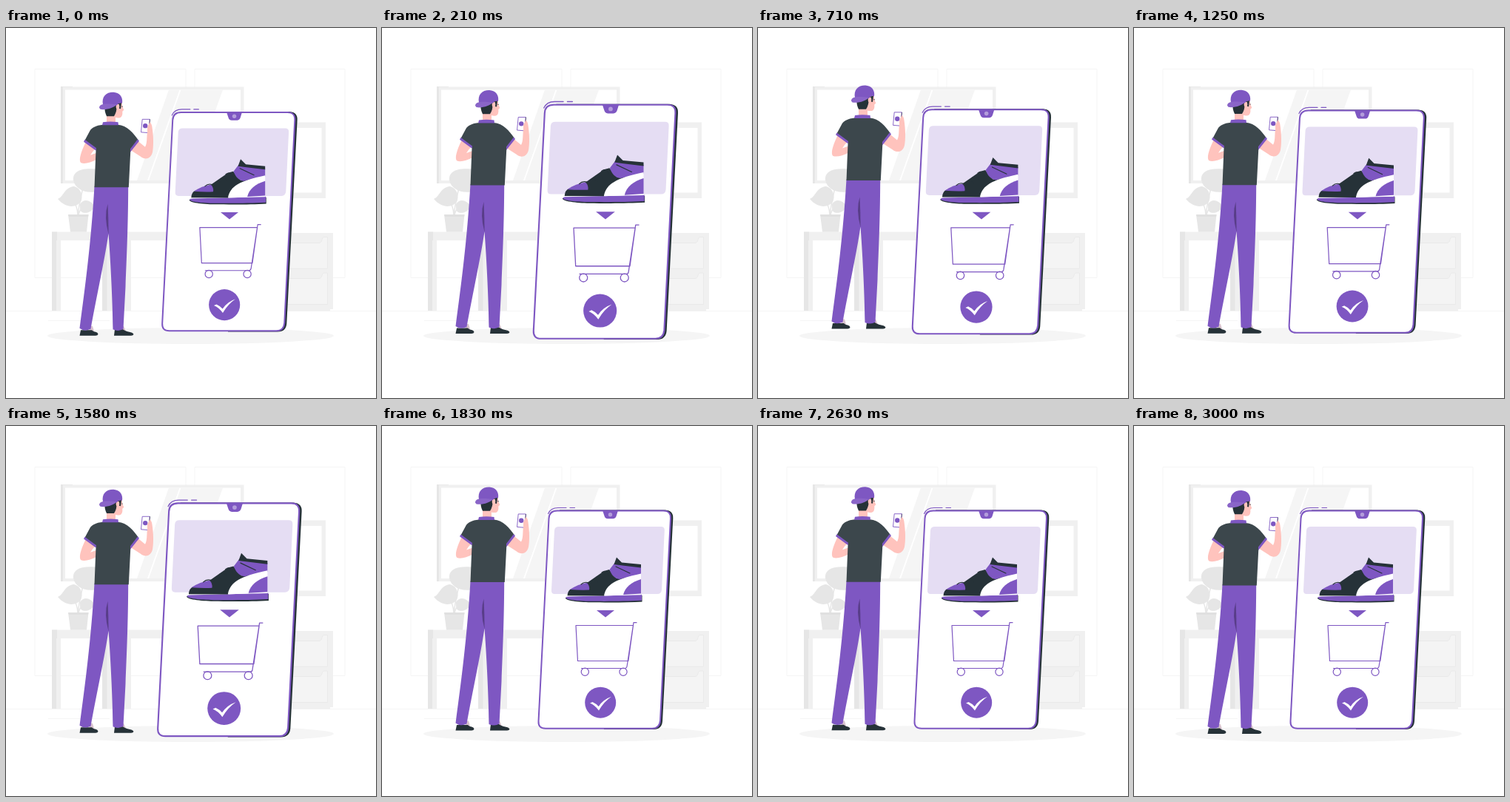
Write an HTML page that moves like this. It is 500 px wide and 500 px high and loops after 3040 ms.

```html
<!DOCTYPE html>
<html lang="en">
<head>
<meta charset="utf-8">
<title>Mobile shopping</title>
<style>
html, body { margin: 0; height: 100%; overflow: hidden; background: #fff; }
svg { display: block; width: 100vw; height: 100vh; }
.p { fill: #7e57c2; }
.d { fill: #263238; }
.s { fill: #ffc3bd; }
.w { fill: #fff; }
.g1 { fill: #f5f5f5; }
.g2 { fill: #f0f0f0; }
.g3 { fill: #e6e6e6; }
.line { fill: none; stroke: #7e57c2; stroke-width: 1.2; stroke-linecap: round; stroke-linejoin: round; }
.thin { fill: none; stroke: #f3f3f3; stroke-width: .8; }
.lace { fill: none; stroke: #263238; stroke-width: 1.1; stroke-linecap: round; }
</style>
</head>
<body>
<svg viewBox="0 0 500 500">
  <!-- room -->
  <path class="thin" d="M0 382.5H500M57 395.5H140M39 55.5H243V337.5H39ZM255 55.5H458V337.5H255Z"/>
  <path class="g3" d="M74 79H90V210H74Z"/>
  <path class="g2" d="M77 79.5H321.5V210H77Z"/>
  <path class="w" d="M80 83.5H317V206H80Z"/>
  <path class="g1" d="M220 83.5H234.5L191 206H177ZM236.5 83.5H293L249 206H193Z"/>
  <path class="g2" d="M340 127.5H432V230H340Z"/>
  <path class="w" d="M346 135H426.5V222.5H346Z"/>
  <path class="g2" d="M330 277H442V380H330Z"/>
  <path class="g2" d="M334 380H438V382.5H334Z"/>
  <path d="M340 290.500H423C428 290.500 426 282.500 430 282.500H434.500V325H340M340 338.500H423C428 338.500 426 331 430 331H434.500V373.500H340" fill="#f4f4f4" stroke="#e8e8e8" stroke-width=".8"/>
  <path class="g2" d="M62 275.500H300V287H74V382H62ZM130 287H169V382H130Z"/>
  <path class="g3" d="M62 275.500H69V287H68V382H62ZM130 287H136.500V382H130Z"/>
  <!-- plant -->
  <path d="M97 253C99 237 104 215 108 200M87 230Q97 239 97 253M108 240Q99 244 98 253" fill="none" stroke="#e6e6e6" stroke-width="1.5"/>
  <path class="g3" d="M91 206C90 194 100 188 126 191V220C110 225 94 219 91 206ZM70 231C78 228 79 215 92 214C101 216 105 227 101 235C94 244 80 243 70 231ZM100 238C105 230 114 232 120 241C116 250 104 253 100 246Z"/>
  <path class="g3" d="M84 252H111.500L109 275.500H87Z"/>
  <path d="M84 252H111.500L111 255H85Z" fill="#e0e0e0"/>
  <ellipse class="g1" cx="249.500" cy="416" rx="193.500" ry="11"/>

  <g id="device">
    <path class="d" d="M240 113.600H383Q394 114.500 393.300 125L379 399Q378 410 367 410H300Z"/>
    <path d="M237 114.500H380Q390.500 114.500 390 125L376 398Q375 408.800 365 408.800H221Q211 408.800 211.500 399L225.500 125Q226 114.500 237 114.500Z" fill="#fff" stroke="#7e57c2" stroke-width="2"/>
    <path class="line" d="M224.500 118.500Q228 110.500 238 110.500H249M254 110.500H260.500"/>
    <path class="p" d="M298 114L300.500 121.500Q301.500 125.300 305 125.300H312Q315.500 125.300 316.700 121.500L319 114Z"/>
    <circle cx="308.500" cy="119.800" r="2.700" fill="#b39ddb"/>
    <path d="M239 136H377Q382 136 381.800 141L378 221Q377.500 227 372 227H233.500Q228.500 227 229 221.500L233 141Q233.500 136 239 136Z" fill="#e5ddf3"/>
    <!-- sneaker -->
    <path class="d" d="M248 232L351.500 229V237.500C330 238.800 300 238.500 282 238.300C265 238 247 236 248 232Z"/>
    <path class="p" d="M248.500 231.500Q250 230 253 230L351 227.800V235.800C330 237 300 237 282 236.800C265 236.500 248 235 248.500 231.500Z"/>
    <path class="w" d="M250 228.500L350 226V228.300L250 230.500Z"/>
    <path class="d" d="M250.500 229.300Q251 222 256 220L277 212L300 196L307 194L317 206L331 204L306 217L301 229.500Z"/>
    <path class="p" d="M254 221C261 216 269 213 277 212Q281 216 280 221.500Q268 222 254 221Z"/>
    <path class="p" d="M307.500 194L314 185.500L350 190V201C340 202 330 205 321 207C314 206 310 201 307.500 194Z"/>
    <path class="w" d="M300 229.500C303 214 315 207 350 199.500V207.500C337 211 328 218 326 228.500Z"/>
    <path class="p" d="M326 228C328.500 218 337 211 350 207V226.500Z"/>
    <path class="d" d="M313.500 187L317 177.500L324 184.500L350 187V191.500L325 188.500Z"/>
    <path class="lace" d="M316 190L335 199M269 214Q274 209 282 213M282 210Q288 205 292 211M290 204Q296 200 299 207M297 198Q303 193 306 202"/>
    <!-- cart -->
    <path class="p" d="M290 249H314L302 258.500Z"/>
    <path class="line" d="M339.500 269.500H262L264.500 317.500H332.800M344 265.700H340L331 325Q330.500 327.500 328 327.500H269.500M339.500 269.500L332.800 317.500"/>
    <circle class="line" cx="274.300" cy="332.200" r="5.100"/>
    <circle class="line" cx="326" cy="332.200" r="5.100"/>
    <circle class="p" cx="295.200" cy="373.700" r="21"/>
    <path class="w" d="M281 374.500L284.500 373Q290 375.500 292.700 379Q299 369.500 310 365.800Q300 372.500 293 384.500Q287.500 377 281 374.500Z"/>
  </g>

  <g id="man">
    <!-- shoes and trousers -->
    <path d="M113 403H117L119 410H113ZM156 403H159L162 410H156Z" fill="#d9c4cf"/>
    <path class="d" d="M101 408.500H116C119 411.500 124 410.500 124.500 414Q124 416 121 416H99.500ZM147 407.500H158C163 411.500 171 410.500 172.500 414Q172 416 169 416H146Z"/>
    <path class="p" d="M119.500 214H165.200C165 270 163 310 161.500 350L158.500 407Q152 411 144.500 407.500C144 365 141 310 138.500 278C134 310 122 365 114.500 407Q106 411 99.500 406C107 350 115 290 119.500 214Z"/>
    <path d="M137.500 238Q138.500 258 138.600 279Q132 255 137.500 238Z" fill="#583d88"/>
    <!-- arms -->
    <path class="s" d="M108 154L121 163Q117 167 114 172L122.500 169V178C115 182 106 184.500 101.500 182.500C97 179 103 164 108 154Z"/>
    <path class="s" d="M177 152L188 161C191 156 190 148 191 140L192 129Q195 125 197.300 133C199.500 147 199.500 160 198 168C196 177 188 179 182 174L168 165Z"/>
    <path d="M184.200 123.500H194.300L192.800 141.800L182.500 141Z" fill="#fff" stroke="#7e57c2" stroke-width=".9"/>
    <path d="M194.500 123.500L193 141.500" stroke="#263238" stroke-width=".6"/>
    <circle class="p" cx="188.200" cy="132.300" r="3.200"/>
    <path class="s" d="M191 134L194.500 127.500Q197 130 197 136L195 145L191 146Z"/>
    <!-- head -->
    <path class="s" d="M136 115L148 100H156.500L157.500 107L159.300 111L157.300 113Q158 120 154 121.500Q150 122 148 121V129H136Z"/>
    <path class="d" d="M133.500 108L152 102L156 101L155 109.500L152.800 109V103L149.500 106Q150 113 146 119.300H136Q133 113 133.500 108Z"/>
    <ellipse class="s" cx="151" cy="106.500" rx="2.300" ry="3.500"/>
    <circle class="d" cx="157" cy="106.300" r=".7"/>
    <path class="p" d="M131 104C129 93 135 87 145 87C153 87.500 158.500 93 157 102Q153 100 149 105Z"/>
    <path d="M126 108C126 103 133 101.500 149 103.500C147 108 135 111.500 127.500 110Z" fill="#8a65c8"/>
    <!-- shirt -->
    <path d="M131 131C121 132 116 135 113.500 139L106 153L121.500 165L119.500 215.500H165.800L168.300 166L179 152C172 142 164 132 151 131Z" fill="#3c474c"/>
    <path class="p" d="M131 127.500Q141 126 151.500 127.500L152 131.500H130ZM106.500 151L122 162.500L121.500 165.800L105 153.800ZM178 150.500L180 153L168 168V163.500Z"/>
  </g>
</svg>
<script>
const device = document.getElementById('device');
const man = document.getElementById('man');
const LOOP = 3040, CYCLE = 3000, FLOAT = 1500;
const beat = [[0, 1], [.1, 1.1], [.3, 1], [.4, 1], [.5, 1.1], [.6, 1], [1, 1]];

function lerpKeys(keys, p) {
  const i = Math.max(1, keys.findIndex(k => k[0] >= p));
  const [a, x] = keys[i - 1], [b, y] = keys[i];
  return x + (y - x) * (p - a) / (b - a);
}

function draw() {
  const t = Math.min(performance.now() % LOOP + 10, CYCLE);
  const scale = lerpKeys(beat, t / CYCLE);
  const lift = 10 * (1 - Math.abs(1 - 2 * (t % FLOAT) / FLOAT));
  device.setAttribute('transform', `translate(302.5 260) scale(${scale}) translate(-302.5 -260)`);
  man.setAttribute('transform', `translate(0 ${-lift})`);
  requestAnimationFrame(draw);
}
draw();
</script>
</body>
</html>
```
